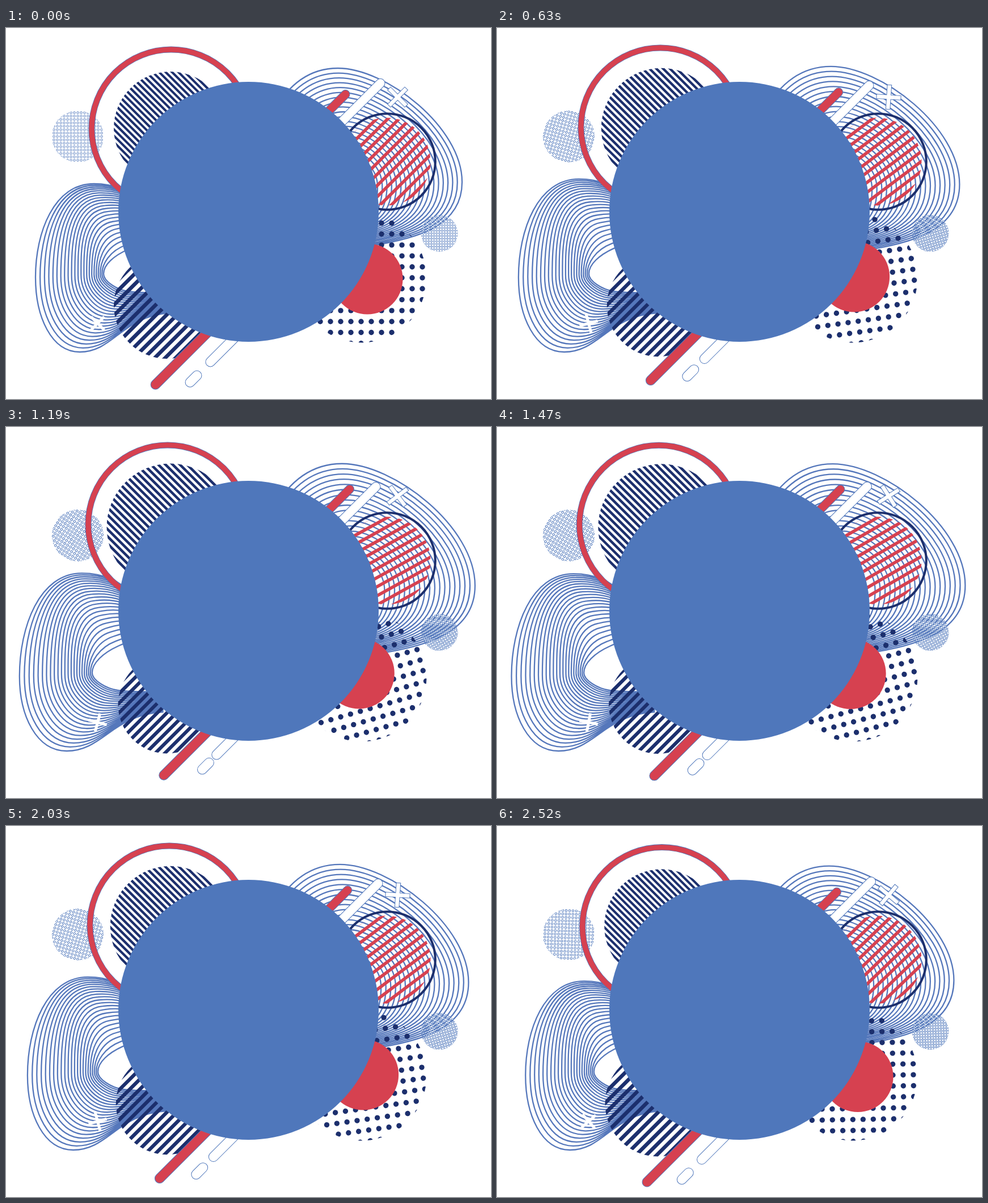
An HTML page with a canvas that plays this animation: 855 px wide and 655 px high, repeating every 2550 ms.

```html
<!DOCTYPE html>
<html lang="en">
<head>
<meta charset="utf-8">
<title>Circle banner</title>
<style>
  html, body { margin: 0; height: 100%; overflow: hidden; background: #fff; }
  canvas { display: block; }
</style>
</head>
<body>
<canvas id="stage" width="855" height="655"></canvas>
<script>
const ctx = document.getElementById('stage').getContext('2d');
const BLUE = '#4f77bb', RED = '#d64150', NAVY = '#1c2f6d', WHITE = '#fff';
const LOOP = 2550, TICK = 70, STEPS = 35;

// Each blob blends from an outer to an inner chain of cubic curves.
const leftBlob = {
  count: 23,
  spread: [-.5, -.5, .5, .5, 0],
  outer: [[240,310],[215,283],[185,275],[155,275],[85,275],[52,360],[52,440],
          [52,510],[80,572],[130,572],[190,572],[205,508],[290,503]],
  inner: [[260,375],[245,380],[230,384],[215,391],[190,402],[172,418],[172,434],
          [172,447],[195,462],[215,465],[235,468],[255,468],[290,467]],
  warp: (x, y, level) => [
    472 + (x - 472) * (1 + .0042 * level),
    y - Math.max(0, 430 - y) * .0068 * level
  ]
};
const rightBlob = {
  count: 19,
  spread: [0, 0, 0, 0],
  outer: [[470,150],[500,95],[540,71],[585,71],[670,71],[804,175],[804,272],
          [804,350],[725,372],[640,385]],
  inner: [[560,270],[575,240],[590,225],[605,225],[630,225],[655,250],[655,280],
          [655,315],[645,340],[615,347]],
  warp: (x, y, level) => {
    const scale = 1 + .0044 * level;
    return [480 + (x - 480) * scale, 160 + (y - 160) * scale];
  }
};

function drawBlob({ count, spread, outer, inner, warp }, level) {
  ctx.beginPath();
  for (let i = 0; i < count; i++) {
    const s = i / (count - 1);
    const p = outer.map(([x, y], j) => {
      const w = s * (1 + spread[Math.round(j / 3)] * (1 - s));
      return warp(x + (inner[j][0] - x) * w, y + (inner[j][1] - y) * w, level);
    });
    ctx.moveTo(...p[0]);
    for (let j = 1; j < p.length; j += 3) {
      ctx.bezierCurveTo(...p[j], ...p[j + 1], ...p[j + 2]);
    }
  }
  ctx.strokeStyle = '#5577bb';
  ctx.lineWidth = 2.3;
  ctx.stroke();
}

function disc(x, y, r, fill) {
  ctx.beginPath();
  ctx.arc(x, y, r, 0, 2 * Math.PI);
  ctx.fillStyle = fill;
  ctx.fill();
}

function ring(x, y, r, width, color) {
  ctx.beginPath();
  ctx.arc(x, y, r, 0, 2 * Math.PI);
  ctx.lineWidth = width;
  ctx.strokeStyle = color;
  ctx.stroke();
}

function at(x, y, degrees, scale, draw) {
  ctx.save();
  ctx.translate(x, y);
  ctx.rotate(degrees * Math.PI / 180);
  ctx.scale(scale, scale);
  draw();
  ctx.restore();
}

function clipDisc(r) {
  ctx.beginPath();
  ctx.arc(0, 0, r, 0, 2 * Math.PI);
  ctx.clip();
}

function stripes(x, y, r, degrees, scale, gap, width, phase, color) {
  at(x, y, degrees, scale, () => {
    clipDisc(r);
    ctx.fillStyle = color;
    for (let d = phase - gap * Math.ceil(r / gap + 1); d < r + gap; d += gap) {
      ctx.fillRect(-r, d - width / 2, 2 * r, width);
    }
  });
}

function ringDots(x, y, r, degrees, gap, dot) {
  at(x, y, degrees, 1, () => {
    clipDisc(r);
    const n = Math.ceil(r / gap);
    ctx.beginPath();
    for (let i = -n; i <= n; i++) {
      for (let j = -n; j <= n; j++) {
        ctx.moveTo(i * gap + dot, j * gap);
        ctx.arc(i * gap, j * gap, dot, 0, 2 * Math.PI);
      }
    }
    ctx.fillStyle = WHITE;
    ctx.fill();
    ctx.strokeStyle = BLUE;
    ctx.lineWidth = 1;
    ctx.stroke();
  });
}

function bigDots(x, y, degrees) {
  at(x, y, degrees, 1, () => {
    clipDisc(114.5);
    for (let i = -7; i <= 7; i++) {
      for (let j = -6; j <= 6; j++) disc(i * 18 - 1, j * 19.3, 4.7, NAVY);
    }
  });
}

// Diagonal rounded bar, rising to the right.
function bar(x, y, length, r, fill) {
  at(x, y, -45, 1, () => {
    ctx.beginPath();
    ctx.roundRect(-r, -r, length + 2 * r, 2 * r, r);
    ctx.fillStyle = fill;
    ctx.fill();
    ctx.strokeStyle = BLUE;
    ctx.lineWidth = 1;
    ctx.stroke();
  });
}

function cross(x, y, degrees, size, width, outline) {
  at(x, y, degrees, 1, () => {
    const paint = (w, extra, color) => {
      ctx.fillStyle = color;
      ctx.fillRect(-size / 2 - extra, -w / 2, size + 2 * extra, w);
      ctx.fillRect(-w / 2, -size / 2 - extra, w, size + 2 * extra);
    };
    if (outline) paint(width + 2, 1, BLUE);
    paint(width, 0, WHITE);
  });
}

function draw(level) {
  ctx.fillStyle = WHITE;
  ctx.fillRect(0, 0, 855, 655);

  drawBlob(leftBlob, level);
  drawBlob(rightBlob, level);

  ringDots(126.5, 191.5, 45.5, 2 * level, 6, 1.8);
  ringDots(764, 362.5, 32.5, -2 * level, 4.7, 1.5);

  const shift = -.38 * level;
  ring(291 + shift, 178 + shift, 140, 11, BLUE);
  ring(291 + shift, 178 + shift, 140, 9.4, RED);
  stripes(290, 177, 100, 45, 1 + .0078 * level, 8, 4.1, 0, NAVY);
  stripes(284, 490, 94, -45, 1 - .005 * level, 13, 6.6, -2, NAVY);
  cross(161.5, 521.5, -45 + 3.75 * level, 33, 5, false);

  bigDots(627, 441, -level);
  disc(637 - .92 * level, 443 - .5 * level, 62.5, RED);

  bar(598.5 - 85 + .46 * level, 117 + 85 - .46 * level, 120.2, 7.5, RED);
  bar(660 - 100 - .5 * level, 97.5 + 100 + .5 * level, 141.4, 8, WHITE);
  cross(690.5, 122, 45 - 90 * level / 17.5, 42, 6.6, true);
  ring(672, 236, 84.8, 4, NAVY);
  stripes(671, 236, 77.5, -45 + level, 1, 14, 5.6, 4, RED);

  bar(263.5 + .92 * level, 629.5 - .92 * level, 200, 8.4, RED);
  bar(360.3 + .68 * level, 589.5 - .68 * level, 150, 8.4, WHITE);
  bar(324.5 + 1.34 * level, 625.5 - 1.3 * level, 17, 8.4, WHITE);

  disc(427.5, 324.5, 229.5, BLUE);
}

// The first and one later pose are held for two ticks.
function stepAt(time) {
  const tick = Math.floor((time % LOOP) / TICK);
  return tick - (tick > 0) - (tick > 26);
}

function frame() {
  const step = stepAt(performance.now());
  draw(Math.min(step, STEPS - step));
  requestAnimationFrame(frame);
}
frame();
</script>
</body>
</html>
```
